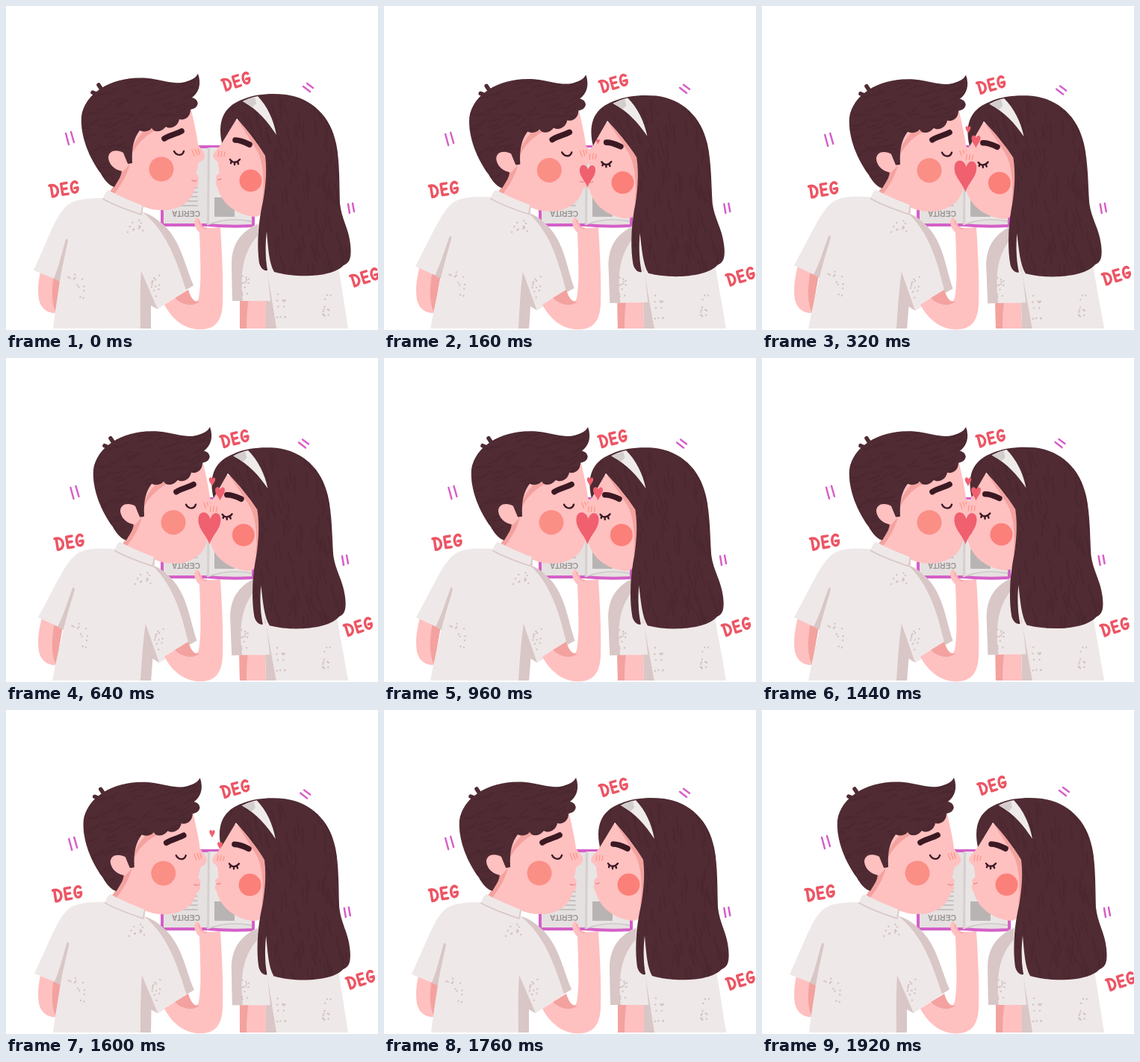
Write an HTML page that moves like this. It is 498 px wide and 435 px high and loops after 2 s.

```html
<!DOCTYPE html>
<html lang="id">
<head>
<meta charset="utf-8">
<title>Deg deg deg</title>
<style>
  html, body { margin: 0; width: 100%; height: 100%; overflow: hidden; background: #fff; }
  svg { display: block; width: 100%; height: 100%; stroke-linecap: round; stroke-linejoin: round; }
  .skin { fill: #ffc0c0; }
  .skin-shade { fill: #f3a29f; }
  .shirt { fill: #efe8e8; }
  .shirt-shade { fill: #d8c7c6; }
  .hair { fill: #502b33; }
  .tuft { fill: none; stroke: #502b33; stroke-width: 5.5; }
  .brow { fill: none; stroke: #3b1923; stroke-width: 7.6; }
  .eye { fill: none; stroke: #3b1923; stroke-width: 2.4; }
  .blush { fill: none; stroke: #f99b8b; stroke-width: 1.4; }
  .lip { fill: none; stroke: #f08d8d; stroke-width: 1.5; }
  .dots { fill: #d3c2c2; }
  .strands { fill: none; stroke: #401f28; stroke-width: 2.2; opacity: .27; }
  .deg { fill: none; stroke: #ec5564; stroke-width: 3.3; }
  .tick { fill: none; stroke: #d75fc9; stroke-width: 2.5; }
  .heart { fill: #f0606f; }
  .title { font: bold 10.4px "Liberation Sans", Arial, sans-serif; fill: #9b9696; }
</style>
</head>
<body>
<svg viewBox="0 0 498 435">
  <defs>
    <path id="boyHair" d="M257 91C262 105 258 116 249 123C259 125 260 137 247 139C247 149 239 154 232 152C230 162 220 166 214 162C208 170 198 170 195 164C190 170 182 169 179 167C171 178 168 190 169 211L163 212L156 197L154 218C157 226 150 234 145 243C136 240 131 232 127 225C112 205 99 175 101 148C106 115 145 93 190 97C210 99 225 106 240 102C250 99 254 96 257 91Z"/>
    <path id="girlHair" d="M289 184C282 150 295 133 318 125C335 118 355 117 375 119C410 124 435 149 442 185C447 210 446 240 447 265C449 285 459 300 461 320C463 338 460 345 452 348C438 364 390 366 359 357C352 345 351 325 349 303C347 320 347 338 350 355C345 356 341 352 339 345C336 325 337 298 342 272C347 250 350 225 347 201C337 184 324 168 309 151Z"/>
    <path id="heart" d="M0 22C-5 8-16 1-15-12C-14-24-2-23 1-12C4-23 15-22 15-11C15 2 4 9 0 22Z"/>
    <path id="deg" d="M-16-7V7.5C-5 8-6-9-18-7M4-7H-3V7H4M-3 0H3M17-5C14-9 9-6 9 1C9 9 17 8 17 1H13"/>
    <clipPath id="floor"><path d="M0 0H498V433H0Z"/></clipPath>
    <clipPath id="inBoyHair"><use href="#boyHair"/></clipPath>
    <clipPath id="inGirlHair"><use href="#girlHair"/></clipPath>
  </defs>

  <g id="book">
    <path d="M209 189H331V295Q300 297 270 294H209Z" fill="#e5e1e0" stroke="#d45fc8" stroke-width="4" stroke-linejoin="miter"/>
    <path d="M270 190H329V288Q295 286 270 294Z" fill="#e9e5e4"/>
    <path d="M270 190H273L272 291L269 294Z" fill="#d5d0cf"/>
    <path d="M269 294Q296 283 329 289" fill="none" stroke="#c9c4c3" stroke-width="1.3"/>
    <path d="M279 257H306V283H279Z" fill="#b8b4b3"/>
    <path id="lines" stroke="#bcb7b6" stroke-width="1.6"/>
    <text class="title" transform="translate(260 275) rotate(180)">CERITA</text>
  </g>

  <path class="skin" d="M49 346C42 368 41 392 47 402C52 410 60 413 67 412L76 360Z"/>
  <path class="skin-shade" d="M65 355L76 360L67 412C61 400 60 382 65 355Z"/>
  <g clip-path="url(#floor)">
    <g id="boyBody">
      <path class="shirt" d="M131 258C110 258 95 259 84 266C68 278 62 300 37 355L72 369C69 392 65 412 62 445H194V402L203 407L251 375C240 350 235 320 215 298C205 288 195 280 183 277Z"/>
      <path class="shirt-shade" d="M80 313C74 335 70 352 64 366L72 370C75 350 80 330 83 315Q82 312 80 313Z"/>
      <path class="shirt-shade" d="M181 356C179 385 180 410 180 445H194V402L203 407Z"/>
      <path class="shirt-shade" d="M183 277C195 280 205 288 215 298C235 320 240 350 251 375L241 381C229 345 216 303 183 277Z"/>
      <g class="dots" id="boyDots"></g>
    </g>
  </g>
  <path class="skin" d="M212 401C222 420 238 433 256 434C278 436 289 425 290 400C291 365 289 330 287 297C280 298 268 299 263 296C261 290 259 285 255 284C250 288 252 298 259 304C260 335 262 370 258 392C256 400 249 398 244 381Z"/>
  <path class="skin-shade" d="M226 392L244 381C247 391 251 398 259 397C250 404 236 402 226 392Z"/>
  <path d="M258 288C259 294 262 298 268 299" fill="none" stroke="#f3a29f" stroke-width="1.3"/>

  <g id="boyHead">
    <path class="skin" d="M246 130C250 150 255 168 257 186C261 192 267 197 266 202C265 208 259 209 257 212C256 218 256 222 254 225C259 228 259 232 256 234C259 238 257 242 253 244C249 262 232 275 208 274C199 274 190 272 183 269V277L139 250C148 236 156 226 160 210V150Z"/>
    <path class="skin-shade" d="M166 212C162 228 154 240 145 252L139 249C149 236 154 226 156 213Z"/>
    <path class="skin-shade" d="M190 163C178 173 169 185 167 202C173 189 182 177 200 167Z"/>
    <use class="hair" href="#boyHair"/>
    <path class="tuft" d="M126 120L116 116M130 115L124 106"/>
    <g class="strands" id="boyStrands" clip-path="url(#inBoyHair)"></g>
    <path class="skin" d="M157 197C148 192 137 194 137 204C138 213 146 221 157 222L166 212H163Z"/>
    <path class="brow" d="M212 178C220 173 228 172 235 168"/>
    <path class="eye" d="M225 195C228 201 236 202 238 195"/>
    <circle cx="208" cy="219" r="16.5" fill="#fa8f86"/>
    <path class="blush" d="M249 193L252 201M253 192L256 200M257 192L259 199"/>
    <path class="lip" d="M249 234Q253 236 256 234"/>
  </g>
  <g id="collar">
    <path class="shirt" d="M137 247C150 255 168 262 183 268C184 272 183 277 181 280C163 274 145 268 130 259C131 254 133 250 137 247Z"/>
    <path d="M130 259C145 268 163 274 181 280L183 269" fill="none" stroke="#d8c7c6" stroke-width="1.6"/>
  </g>

  <g clip-path="url(#floor)">
    <g id="girlBody">
      <path class="skin" d="M313 394H348V445H313Z"/>
      <path class="skin-shade" d="M313 394H325C322 410 322 425 322 445H313Z"/>
      <path class="shirt" d="M337 292C318 302 303 315 302 345L303 396H348V445H460L445 350L350 292Z"/>
      <path class="shirt-shade" d="M337 293C318 302 303 315 302 345L303 396H317C313 355 318 330 337 308Z"/>
      <path class="shirt-shade" d="M348 345L364 445H348Z"/>
      <path class="shirt" d="M335 345L350 355L354 396H335Z"/>
      <g class="dots" id="girlDots"></g>
    </g>
  </g>
  <g id="girlHead">
    <path class="skin" d="M301 148L288 185C284 192 277 196 277 201C278 207 284 207 284 212C285 218 286 222 285 225C280 227 280 231 283 233C279 236 281 241 283 243C287 262 305 280 333 283C343 283 349 270 350 250V180Z"/>
    <path class="skin-shade" d="M309 151L349 200V245L343 262C347 235 344 208 336 194Z"/>
    <use class="hair" href="#girlHair"/>
    <g class="strands" id="girlStrands" clip-path="url(#inGirlHair)"></g>
    <path d="M317 128C325 124 332 122 337 121C350 135 358 152 362 173C350 155 338 140 317 128Z" fill="#efebeb"/>
    <path d="M317 128Q325 124 333 122L335 131L330 136Z" fill="#d3cecd"/>
    <path class="brow" d="M307 180C314 180 320 183 326 186"/>
    <path class="eye" d="M300 206C303 211 309 211 313 206M302 208L301 211M306 210V213M310 209L311 212"/>
    <circle cx="327.5" cy="234.5" r="15" fill="#fb8079"/>
    <path class="blush" d="M285 195L284 202M289 195L288 202M293 196L292 202"/>
    <path class="lip" d="M283 233Q286 234 288 232"/>
  </g>

  <use class="heart" href="#heart" id="bigHeart"/>
  <use class="heart" href="#heart" id="midHeart"/>
  <use class="heart" href="#heart" id="topHeart"/>

  <use class="deg" href="#deg" id="degTop" role="img" aria-label="DEG"/>
  <use class="deg" href="#deg" id="degLeft" role="img" aria-label="DEG"/>
  <use class="deg" href="#deg" id="degRight" role="img" aria-label="DEG"/>
  <path class="tick" id="tickLeft" d="M80 171L84 186M87 169L91 183"/>
  <path class="tick" id="tickTop" d="M398 108L407 115M403 104L411 110"/>
  <path class="tick" id="tickRight" d="M458 266L460 278M464 265L466 276"/>
</svg>

<script>
  const LOOP = 2000, STEP = 80;
  const el = id => document.getElementById(id);
  const place = (id, transform) => el(id).setAttribute('transform', transform);
  const clamp = v => Math.min(1, Math.max(0, v));
  const easeOut = v => 1 - (1 - clamp(v)) ** 3;
  const repeat = (n, make) => Array.from({ length: n }, (_, i) => make(i)).join('');

  let seed = 7;
  const random = () => (seed = seed * 16807 % 2147483647) / 2147483647;
  const spread = r => (random() * 2 - 1) * r;

  function addDots(id, x, y, rx, ry) {
    el(id).innerHTML += repeat(12, () =>
      `<circle cx="${x + spread(rx)}" cy="${y + spread(ry)}" r="1.2"/>`);
  }

  function addStrands(id, x, y, rx, ry, dx, dy) {
    const d = repeat(170, () =>
      `M${x + spread(rx)} ${y + spread(ry)}q${dx / 2 + spread(3)} ${dy / 2 + spread(3)} ${dx + spread(4)} ${dy + spread(4)}`);
    el(id).innerHTML = `<path d="${d}"/>`;
  }

  el('lines').setAttribute('d', repeat(6, i => `M226 ${238 + 6 * i}H256`));
  addDots('boyDots', 174, 296, 11, 9);
  addDots('boyDots', 94, 374, 12, 22);
  addDots('boyDots', 198, 376, 9, 16);
  addDots('girlDots', 320, 375, 5, 15);
  addDots('girlDots', 369, 404, 6, 17);
  addDots('girlDots', 430, 402, 6, 15);
  addStrands('boyStrands', 172, 160, 85, 75, 15, -5);
  addStrands('girlStrands', 370, 240, 90, 125, 3, 18);

  // Lean in at once, lean back from the given time.
  const lean = (t, back) => easeOut(t / 360) * (1 - easeOut((t - back) / 360));

  // Hearts pop up at one time and shrink away from another.
  const pop = (t, start, end) => easeOut((t - start) / 360) * clamp(1 - (t - end) / 160);

  function draw(t) {
    const boy = lean(t, 1440), girl = lean(t, 1405);
    const sway = clamp(1.3 * Math.sin(Math.PI * t / 1920));
    const drift = (id, x, y, pose = '') =>
      place(id, `translate(${x * sway} ${y * sway}) ${pose}`);
    const heart = (id, x, y, size) =>
      place(id, `translate(${x} ${y}) scale(${size})`);

    place('boyHead', `translate(${16 * boy} ${1.7 * boy})`);
    place('collar', `translate(${15.5 * boy} ${-.5 * boy})`);
    place('boyBody', `matrix(1 ${.052 * boy} ${-.077 * boy} 1 ${33.3 * boy} ${-8.6 * boy})`);
    place('girlHead', `rotate(${-1.65 * girl} 432 571)`);
    place('girlBody', `rotate(${-1.2 * girl} 458 433)`);

    heart('bigHeart', 272.5, 228, pop(t, 40, 1440));
    heart('midHeart', 286.5, 182, .43 * pop(t, 110, 1525));
    heart('topHeart', 276, 166, .28 * pop(t, 160, 1580));

    drift('degTop', -2, 7, `translate(308.5 101) rotate(${-17 + 3 * sway}) scale(1.03)`);
    drift('degLeft', 7, 1.5, 'translate(78 245.5) rotate(-9) scale(1.06)');
    drift('degRight', -8.5, -3.5, 'translate(480.5 364) rotate(-17) scale(1.03)');
    drift('tickLeft', 6.5, 3);
    drift('tickTop', -6, 5.5);
    drift('tickRight', -8, 0);
  }

  function tick() {
    draw(Math.floor(performance.now() % LOOP / STEP) * STEP);
    requestAnimationFrame(tick);
  }
  tick();
</script>
</body>
</html>
```
